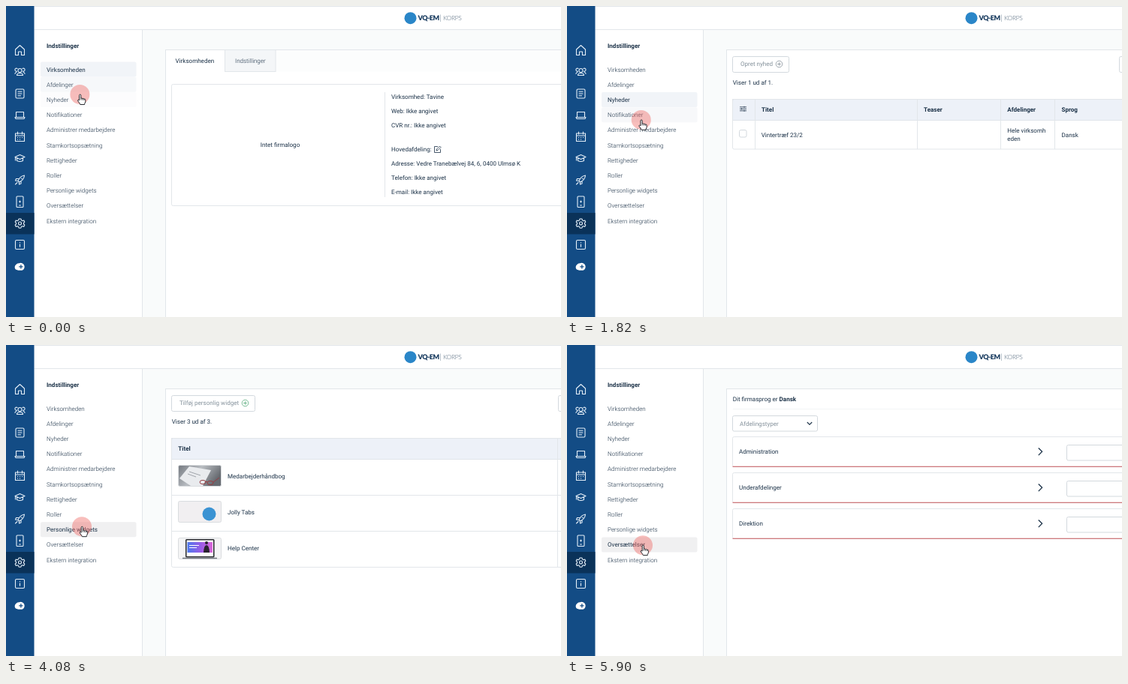
Write an HTML page that moves like this. It is 739x415 px and loops after 5.96 s.

```html
<!DOCTYPE html>
<html lang="da">
<head>
<meta charset="utf-8">
<style>
html, body { margin: 0; width: 100%; height: 100%; overflow: hidden; background: #fff; }
svg { display: block; width: 739px; height: 415px; }
text { font: 400 8.05px Roboto, sans-serif; fill: #1c3248; text-rendering: geometricPrecision; }
.light { font-weight: 300; }
.bold { font-weight: 700; }
.grey { fill: #84919b; }
.line { fill: none; stroke: #e2e6ea; }
.box { fill: #fff; stroke: #d3d9de; }
.icon { fill: none; stroke: #e4eef7; stroke-width: 1.1; stroke-linecap: round; stroke-linejoin: round; }
.dark { fill: none; stroke: #1c3248; stroke-width: 1.1; }
.brand { font: 900 9px Lato, sans-serif; letter-spacing: -.5px; fill: #173a5e; }
.product { font: 300 8.5px Lato, sans-serif; letter-spacing: -.4px; fill: #50667b; }
</style>
</head>
<body>
<svg id="stage" viewBox="0 0 739 415"></svg>
<script>
const LOOP = 5960;
const items = ['Virksomheden', 'Afdelinger', 'Nyheder', 'Notifikationer', 'Administrer medarbejdere',
  'Stamkortsopsætning', 'Rettigheder', 'Roller', 'Personlige widgets', 'Oversættelser', 'Ekstern integration'];
const ROW = 20.2, TOP = 74.6;

// Markup helpers; text is placed by its visual middle.
const text = (x, mid, s, cls = '', extra = '') => `<text x="${x}" y="${mid + 2.9}" class="${cls}" ${extra}>${s}</text>`;
const rect = (x, y, w, h, attrs) => `<rect x="${x}" y="${y}" width="${w}" height="${h}" ${attrs}/>`;
const path = (d, cls, attrs = '') => `<path d="${d}" class="${cls}" ${attrs}/>`;
const icon = (y, d) => path(d, 'icon', `transform="translate(18.5 ${y})"`);
const box = (x, y, w, h) => rect(x, y, w, h, 'class="box" rx="2"');

const card = rect(212.5, 58.5, 540, 380, 'fill="#fff" stroke="#e2e6ea"');
const addButton = (w, label) => box(220.5, 67.5, w, 21) + text(231, 77.3, label, 'grey') +
  path(`M${w + 203.5} 77.5h8m-4-4v8`.replace('h8m-4-4v8', 'm1.7 0h4.6m-2.3-2.3v4.6') +
    `M${w + 203.2} 77.5a4.3 4.3 0 1 0 8.6 0a4.3 4.3 0 1 0 -8.6 0`, 'plus', 'fill="none" stroke="#6db58c" stroke-width=".9"') +
  box(735.5, 67.5, 20, 21);

const sidebar = rect(0, 0, 37.5, 415, 'fill="#134c85"') + rect(0, 276, 37.5, 28.5, 'fill="#0a3259"') +
  icon(59, 'M-6 -1L0 -6.5L6 -1V6.5H2V2H-2V6.5H-6Z') +
  icon(88, 'M-2.5 -2a2.5 2.5 0 1 0 5 0a2.5 2.5 0 1 0 -5 0M-4 4.5q0 -3 4 -3t4 3zM-3.5 -4.5a2 2 0 1 0 -.5 3.6M3.5 -4.5a2 2 0 1 1 .5 3.6M-6.5 2.5q0 -2 2 -2.3M6.5 2.5q0 -2 -2 -2.3') +
  icon(117, 'M-4 -6H4q1.5 0 1.5 1.5V4.5q0 1.5 -1.5 1.5H-4q-1.5 0 -1.5 -1.5V-4.5q0 -1.5 1.5 -1.5M-2.5 -2.8H2.5M-2.5 0H2.5M-2.5 2.8H1') +
  icon(146, 'M-5 2.5V-4.5H5V2.5M-6.5 2.5H6.5L5.5 4.5H-5.5Z') +
  icon(174.5, 'M-6 -4.5H6V6H-6ZM-6 -1.5H6M-3 -6.5V-3.5M3 -6.5V-3.5M-3 1h.2M0 1h.2M3 1h.2M-3 3.6h.2M0 3.6h.2') +
  icon(203, 'M-6.5 -1.5L0 -4.5L6.5 -1.5L0 1.5ZM-4 0V3.5Q0 5.5 4 3.5V0M-6 -1V3') +
  icon(232, 'M-2.5 1.5Q0 -5 6 -6Q5.5 0 -1 3ZM-2 -1.5H-5L-6 1L-2.5 1.5M1.5 2V5L-1 6V3M-3.5 3.5L-6 6M1.8 -1.8h1') +
  icon(261, 'M-3.5 -7H3.5Q4.5 -7 4.5 -6V6.5Q4.5 7.5 3.5 7.5H-3.5Q-4.5 7.5 -4.5 6.5V-6Q-4.5 -7 -3.5 -7M-1 0H1M0 -1V1M-1 5H1') +
  icon(290, 'M-1.4 -6H1.4L1.9 -4.2L3.6 -3.3L5.3 -4L6.3 -1.8L5 -.5V1L6.3 2.2L5.2 4.4L3.4 3.8L1.9 4.6L1.4 6.2H-1.4L-1.9 4.6L-3.4 3.8L-5.2 4.4L-6.3 2.2L-5 1V-.5L-6.3 -1.8L-5.3 -4L-3.6 -3.3L-1.9 -4.2ZM-2 0a2 2 0 1 0 4 0a2 2 0 1 0 -4 0') +
  icon(318.5, 'M-4.5 -6H4.5Q6 -6 6 -4.5V4.5Q6 6 4.5 6H-4.5Q-6 6 -6 4.5V-4.5Q-6 -6 -4.5 -6M0 -.5V2.8M0 -2.9v.1') +
  `<g transform="translate(18.5 347.5)"><path d="M-2 5.2H3a5 5 0 1 0 -4 -9.5a4.8 4.8 0 0 0 -1 9.5Z" fill="#fff"/>
   <circle cx="-3" cy="1" r="3.8" fill="#fff"/><path d="M-1.2 .4H4M1.4 -2.2V3" stroke="#134c85" stroke-width="1.3"/></g>`;

const header = rect(37.5, 0, 702, 31.5, 'fill="#fff"') + path('M37.5 .5H739M37.5 31.5H739', 'line') +
  '<circle cx="538.5" cy="16.2" r="8" fill="#2a86c8"/>' +
  '<text x="548.5" y="19.4" class="brand">VQ-EM</text>' + path('M578.5 11.5V21', '', 'stroke="#a9b5c0" stroke-width=".8"') +
  '<text x="582" y="19.3" class="product">KORPS</text>';

const menu = rect(37.5, 32, 144, 383, 'fill="#fff"') + path('M181.5 32V415', 'line') +
  text(54, 53, 'Indstillinger', 'bold') +
  items.map((s, i) => `<g class="item">${rect(46, TOP + i * ROW, 127.5, ROW - .2, 'rx="2"')}` +
    text(54, TOP + 10 + i * ROW, s) + '</g>').join('');

const details = [[121.5, 'Virksomhed: Tavine'], [140.5, 'Web: Ikke angivet'], [159.5, 'CVR nr.: Ikke angivet'],
  [191.3, 'Hovedafdeling:'], [210.3, 'Adresse: Vedre Tranebælvej 84, 6, 0400 Ulmsø K'],
  [229.3, 'Telefon: Ikke angivet'], [248.3, 'E-mail: Ikke angivet']];

const companyPage = card + rect(291.5, 59, 448, 28.5, 'fill="#fcfdfd"') +
  rect(291.5, 58.5, 67.5, 29, 'fill="#f4f6f8" stroke="#e2e6ea"') +
  text(225.5, 72.7, 'Virksomheden') + text(305, 72.7, 'Indstillinger', 'light') +
  rect(220.5, 104.5, 540, 162, 'rx="2" class="line"') + path('M504.5 115V255', 'line') +
  text(365, 184.8, 'Intet firmalogo', '', 'text-anchor="middle"') +
  details.map(([y, s]) => text(513, y, s)).join('') +
  path('M575 187.5H570.5V195.5H578.5V191M573 193L573.5 191L577.5 187L579 188.5L575 192.5Z', 'dark', 'style="stroke-width:.8"');

const tableHead = rect(220.5, 124.5, 540, 28, 'fill="#edf1f8" stroke="#e0e5ea"');

const newsPage = card + addButton(75, 'Opret nyhed') + text(220.7, 102, 'Viser 1 ud af 1.') + tableHead +
  rect(220.5, 124.5, 540, 66.5, 'rx="2" class="line"') +
  path('M250.5 125V191M466.5 125V191M577.5 125V191M649.5 125V191', 'line') +
  path('M230 134.8H239M230 137.3H239M230 139.8H239M236 133.8v2M232.5 136.3v2M236 138.8v2', 'dark', 'style="stroke-width:.8"') +
  [[259, 'Titel'], [475, 'Teaser'], [586.3, 'Afdelinger'], [658.5, 'Sprog']].map(([x, s]) => text(x, 138.5, s, 'bold')).join('') +
  box(229.5, 165.5, 9.5, 9.5) + text(258.7, 171.7, 'Vintertræf 23/2') +
  text(586.3, 166.2, 'Hele virksomh') + text(586.3, 177.2, 'eden') + text(658.5, 171.7, 'Dansk');

const thumb = (y, fill) => rect(229.5, y, 57, 28, `rx="2" fill="${fill}" stroke="#d9dcdf"`);
const widgetPage = card + addButton(111, 'Tilføj personlig widget') + text(220.7, 102, 'Viser 3 ud af 3.') + tableHead +
  rect(220.5, 124.5, 540, 172, 'rx="2" class="line"') +
  path('M220 200.5H739M220 248.5H739M734.5 125V296', 'line') + text(229.3, 138, 'Titel', 'bold') +
  ['Medarbejderhåndbog', 'Jolly Tabs', 'Help Center'].map((s, i) => text(295, 174.7 + i * 48.4, s)).join('') +
  thumb(160.5, 'url(#desk)') +
  path('M231 178L244 162L273 167L262 188H246Z', '', 'fill="#e9ebee"') +
  path('M244 169L259 174M242 172L253 176', '', 'stroke="#989ca3" stroke-width=".9"') +
  path('M258 183a4 2.6 0 1 0 8 0a4 2.6 0 1 0 -8 0M268 184a4 2.6 0 1 0 8 0a4 2.6 0 1 0 -8 0M266 182.5h2M276 183L284 177', '', 'fill="none" stroke="#963d42"') +
  thumb(208.5, '#f1eff1') + '<circle cx="270.5" cy="225.5" r="9" fill="#3b93d3"/>' +
  thumb(257.5, '#f4f4f5') + rect(239, 259, 38.5, 24.5, 'rx="1.5" fill="#25272c"') +
  rect(240.5, 260.5, 35.5, 21.5, 'fill="#fff"') + rect(241.5, 263, 33.5, 14, 'fill="url(#screen)"') +
  path('M244 267.5H257M244 270.5H254', '', 'stroke="#fff" stroke-width="1.2"') +
  '<circle cx="267" cy="264" r="2" fill="#29222f"/>' + path('M263 277Q263.5 267 267 267T271 277Z', '', 'fill="#29222f"') +
  path('M235 284.5H281', '', 'stroke="#777b82" stroke-width="1.5"');

const languageRow = (s, i) => {
  const y = 122.5 + i * 48;
  return rect(220.5, y, 540, 40, 'rx="2" class="line"') + path(`M220.5 ${y + 39.7}H739`, '', 'stroke="#c5545a" stroke-width="1.1"') +
    text(229, y + 20, s) + path(`M627.8 ${y + 15}L632.6 ${y + 19.8}L627.8 ${y + 24.6}`, 'dark', 'style="stroke-width:1.3"') +
    box(665.5, y + 11, 100, 20.5);
};
const languagePage = card + text(220.7, 72.2, 'Dit firmasprog er <tspan class="bold">Dansk</tspan>') +
  path('M221 85.5H739', '', 'stroke="#f3f5f6"') + box(220.5, 94.5, 113, 20.5) + text(230, 104.6, 'Afdelingstyper', 'grey') +
  path('M319.8 103L323 106.2L326.2 103', 'dark') +
  ['Administration', 'Underafdelinger', 'Direktion'].map(languageRow).join('');

const pages = [companyPage, card, newsPage, widgetPage, languagePage];
const cursor = `<g id="cursor"><circle r="13" fill="#ef6460" opacity=".42"/>
  <circle id="ring" fill="none" stroke="#fff" stroke-width="1.6"/>
  <path d="M-.8 8V1.2Q-.8 0 .3 0T1.4 1.2V5.2Q2.5 4.4 3.5 5.5Q4.6 4.8 5.5 6Q7.4 5.6 7.4 7.5V9.5Q7.2 11 6.3 12.2V13.4H.4Q-.4 11.3 -2.6 8.8Q-3.2 7.5 -2.2 7.1Q-1.4 7 -.8 8Z" fill="#fff" stroke="#23262b" stroke-width="1"/>
  <path d="M1.4 5.2V7.5M3.5 5.5V7.7M5.5 6V7.9" stroke="#23262b" stroke-width=".8"/></g>`;

const stage = document.getElementById('stage');
stage.innerHTML = `<defs>
  <linearGradient id="desk" x2="1" y2=".4"><stop stop-color="#747980"/><stop offset=".5" stop-color="#b9bdc2"/><stop offset="1" stop-color="#666a70"/></linearGradient>
  <linearGradient id="screen"><stop stop-color="#4c78ec"/><stop offset=".55" stop-color="#9b5be6"/><stop offset="1" stop-color="#dc68d8"/></linearGradient>
  </defs>` + rect(0, 0, 739, 415, 'fill="#f9fbfb"') +
  pages.map(p => `<g class="page">${p}</g>`).join('') + menu + header + sidebar + cursor;

const pageNodes = stage.querySelectorAll('.page');
const itemNodes = stage.querySelectorAll('.item');
const plus = stage.querySelector('.plus');
const pointer = document.getElementById('cursor');
const ring = document.getElementById('ring');

// Each step: start, end, x and y reached.
const moves = [[-400, 330, 98.2, 128.5], [1500, 2600, 101, 242.3], [4600, 5000, 101, 267.2]];
const clicks = [570, 3140, 5270];
const views = [[0, 0, 0], [1160, 1, 2], [1290, 2, 2], [3600, 3, 8], [5500, 4, 9]];

function position(t) {
  let x = 98.6, y = 104;
  for (const [a, b, px, py] of moves) {
    const u = Math.min(1, Math.max(0, (t - a) / (b - a))), s = u * u * (3 - 2 * u);
    x += (px - x) * s;
    y += (py - y) * s;
  }
  return [x, y];
}

// Hover strength is the share of the last 250 ms spent over the item.
function hover(t) {
  const share = items.map(() => 0);
  for (let k = 0; k < 25; k++) share[Math.floor((position(t - k * 10)[1] - TOP) / ROW)] += .04;
  return share;
}

function draw(t) {
  const [, page, active] = views.filter(v => v[0] <= t).pop();
  pageNodes.forEach((n, i) => n.style.display = i === page ? '' : 'none');
  plus.style.stroke = t < 2480 ? '#939da5' : '#6db58c';

  const share = hover(t);
  itemNodes.forEach((n, i) => {
    const on = i === active, [bg, label] = n.children;
    bg.style.fill = !on ? '#f3f5f8' : share[i] > .5 && page > 0 ? '#f0f0f1' : '#f1f4f8';
    bg.style.opacity = on ? 1 : share[i];
    label.style.fontWeight = on ? 400 : 300;
  });

  const [x, y] = position(t);
  pointer.setAttribute('transform', `translate(${x} ${y})`);
  const age = Math.min(...clicks.map(c => t >= c ? (t - c) / 330 : 1), 1);
  ring.setAttribute('r', 1 + 12 * age);
  ring.setAttribute('opacity', .6 * (1 - age));
}

const start = performance.now();
function tick() {
  draw((performance.now() - start) % LOOP);
  requestAnimationFrame(tick);
}
tick();
</script>
</body>
</html>
```
